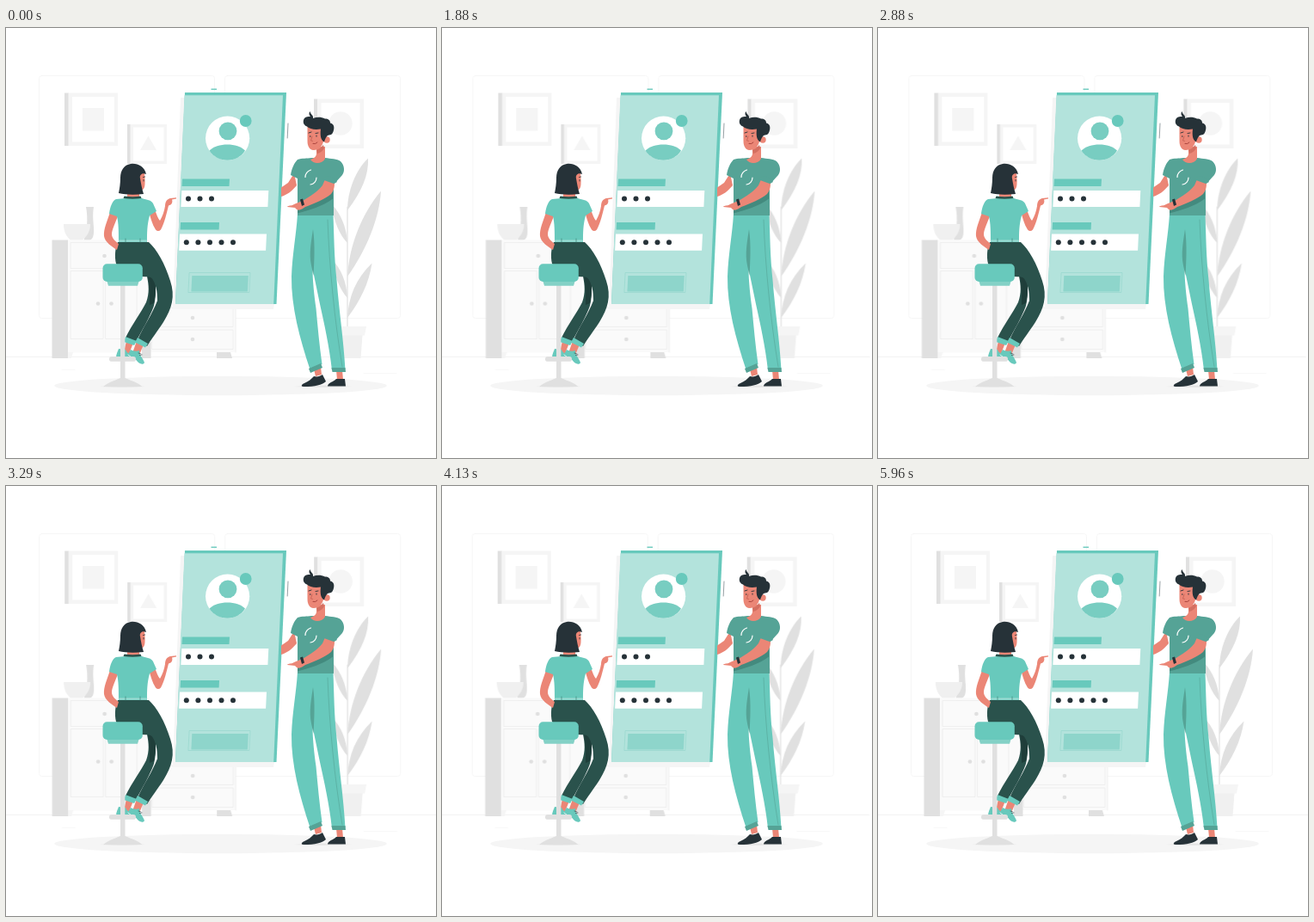
These frames come from a looping animation (500 by 500 pixels, 6.04 s). An HTML page without scripts:

```html
<!DOCTYPE html>
<html lang="en">
<head>
<meta charset="utf-8">
<title>Sign in</title>
<style>
  html, body { margin: 0; width: 100%; height: 100%; overflow: hidden; background: #fff; }
  svg { display: block; width: 100%; height: 100%; }
  .teal { fill: #68c9bc; }
  .soft { fill: #78cdc1; }
  .deep { fill: #55a396; }
  .ink { fill: #263238; }
  .skin { fill: #eb8676; }
  .pants { fill: #2a524c; }
  .g1 { fill: #f5f5f5; }
  .g2 { fill: #f0f0f0; }
  .g3 { fill: #e0e0e0; }
  .white { fill: #fff; }
  .line { fill: none; stroke-linecap: round; stroke-linejoin: round; }
  .room { animation: shake 6.04s linear -20ms infinite; }
  /* each leg lasts 600 ms */
  @keyframes shake {
    0%, 100% { transform: translateX(0); }
    9.93%, 89.4% { transform: translateX(-1px); }
    19.87%, 79.47% { transform: translateX(2px); }
    29.8%, 49.67%, 69.54% { transform: translateX(-4px); }
    39.74%, 59.6% { transform: translateX(4px); }
  }
</style>
</head>
<body>
<svg viewBox="0 0 500 500" xmlns="http://www.w3.org/2000/svg">
  <g class="room">
    <g class="line" stroke="#f4f4f4" stroke-width=".8">
      <rect x="38.500" y="55.500" width="204" height="282" rx="3"/>
      <rect x="254.500" y="55.500" width="204" height="282" rx="3"/>
    </g>
    <path class="line" stroke="#ededed" stroke-width=".7" d="M0 382.400H500"/>
    <path class="line" stroke="#f3f3f3" stroke-width=".6" d="M65 397.500h15M416 401.500h38"/>

    <!-- pictures -->
    <path class="g3" d="M68 75.500h5v61.500h-5z"/>
    <path class="g1" d="M72.500 75.500h57.500v61.500h-57.500z"/>
    <path class="white" d="M77 80h49v52.500h-49z"/>
    <path class="g1" d="M89 93h25v26.500h-25z"/>
    <path class="g3" d="M141 112h4v46h-4z"/>
    <path class="g1" d="M144.500 112h42.500v46h-42.500z"/>
    <path class="white" d="M148 115.500h35.500v39h-35.500z"/>
    <path class="g1" d="M165.500 125.500l9.500 16.500h-19z"/>
    <path class="g3" d="M358 82.500h4.500v57.500h-4.500z"/>
    <path class="g1" d="M362 82.500h54v57.500h-54z"/>
    <path class="white" d="M366.500 87h45v48.500h-45z"/>
    <circle class="g1" cx="389" cy="111" r="13.700"/>

    <!-- cabinets -->
    <path class="g3" d="M93 208h9c-1.500 10-.5 15 0 24c.6 9-1 14-4.500 14.500h-7c4-10 5-25 2.500-38.500z"/>
    <path class="g2" d="M67 228h31c0 9-4 14-9 18.500h-14c-5-4-8-10-8-18.500z"/>
    <path fill="#fafafa" d="M72 246.500h94v131h-94zM168 319h99v58h-99z"/>
    <path class="g3" d="M53.500 246.500h18.500v137.500h-18.500zM158 365h10.500v19h-10.500zM245 377h16l2 7h-18z"/>
    <path class="g1" d="M72 377h6l-2 7h-4z"/>
    <g class="line" stroke="#ececec" stroke-width=".8">
      <path d="M75.500 249.500h75v30h-75zM75.500 282.500h37.500v79h-37.500zM116 282.500h36v79h-36z"/>
      <path d="M170 325.500h94v22h-94zM170 351h94v22.500h-94zM267 319v58"/>
    </g>
    <g class="g3">
      <circle cx="114.500" cy="265" r="2.300"/><circle cx="107" cy="320.500" r="2.300"/>
      <circle cx="122.500" cy="320.500" r="2.300"/><circle cx="217" cy="337" r="2.300"/>
      <circle cx="217" cy="362" r="2.300"/>
    </g>

    <!-- plant -->
    <path class="line" stroke="#e0e0e0" stroke-width="1.200" d="M397 208V348"/>
    <g class="g3">
      <path d="M421 151.500C422 170 414 190 397 212C397 190 406 166 421 151.500z"/>
      <path d="M436 189.500C434 222 419 258 397 289C399 252 414 216 436 189.500z"/>
      <path d="M425.500 273.500C422 297 412 317 397 337C398 313 407 291 425.500 273.500z"/>
      <path d="M379 205C389 216 396 231 397 250C388 241 381 225 379 205z"/>
      <path d="M380 270C389 280 396 294 397 314C388 304 382 289 380 270z"/>
    </g>
    <path class="g2" d="M384.500 357h30l-2 27h-26z"/>
    <path class="g1" d="M382 347h37l-2 10.500h-33z"/>
  </g>

  <ellipse class="g1" cx="249.500" cy="416" rx="193.500" ry="11.200"/>
  <path fill="#e4e4e4" d="M109 417q26-3 53 0q-27 1.500-53 0zM334 417q35-3 69 0q-35 1.500-69 0z"/>

  <!-- phone -->
  <path class="g1" d="M203 81h8l-6 240h107l-1 6h-117z"/>
  <path class="teal" d="M208 75h118l-11.500 246h-117.500z"/>
  <path fill="#b3e3dc" d="M207.500 78.300h114.500l-10.800 242.700h-114.200z"/>
  <path class="teal" d="M238.500 70.500h6.500v1.400h-6.500z"/>
  <path class="line" stroke="#7c888d" stroke-width=".8" d="M328 111l-.8 17"/>
  <circle class="white" cx="257.600" cy="128.200" r="25.600"/>
  <circle class="soft" cx="258" cy="119.800" r="10.400"/>
  <path class="soft" d="M236.500 142.500c9-9.500 33-9.500 41.500 0c-9 15-32 15-41.500 0z"/>
  <circle class="teal" cx="278.700" cy="108" r="6.900"/>
  <path class="teal" d="M205 175.500h55l-.5 8.500h-55zM203 226h45l-.4 8.500h-45z"/>
  <path class="white" d="M204.300 189h101l-.9 19h-101zM202 239.500h101l-.9 19.200h-101z"/>
  <g class="ink">
    <circle cx="212" cy="198.500" r="3"/><circle cx="225.500" cy="198.500" r="3"/>
    <circle cx="239" cy="198.500" r="3"/>
    <circle cx="209.800" cy="249.200" r="3"/><circle cx="223.400" cy="249.200" r="3"/>
    <circle cx="237" cy="249.200" r="3"/><circle cx="250.500" cy="249.200" r="3"/>
    <circle cx="264" cy="249.200" r="3"/>
  </g>
  <path fill="#8ed5cb" d="M216.300 288h65.500l-.9 18.500h-65.500z"/>
  <path class="line" stroke="#93d5cc" stroke-width=".6" d="M213.500 284.500h70.500l-1.200 23h-70.500z"/>

  <!-- stool base -->
  <path class="g3" d="M133 299h5.300v108c7 3 15 5 20 10h-45c5-5 13-7 19.700-10z"/>

  <!-- woman -->
  <path class="skin" d="M140 364l-3 13 6 2 5-13zM152 364l-5 14 8 2 5-12z"/>
  <path class="pants" d="M150 274h18c6 16 8 32 4 49c-5 14-13 27-21 42l-12-5c8-16 18-29 24-41c4-11 3-20 1-30z"/>
  <path fill="#1f3e3a" d="M165 289l8 3c2 10 1 19-1 28l-5 2c0-10 0-22-2-33z"/>
  <path class="pants" d="M130 249h36c9 8 19 25 25 45c6 18 2 32-8 48c-7 11-13 18-19 28l-11-7c6-15 17-30 23-46c0-10-1-20-8-28c-16 1-32-2-40-15c-2-9-1-18 2-25z"/>
  <path class="teal" d="M139 359l13 5-3 5-12-4zM153 360l12 7-3 4.500-12-6z"/>
  <path class="teal" d="M131 373l8 1c1 3 5 6 8 7l-1 3-18-1c0-4 2-7 3-10zM145 374c3 2 7 2 10 1c0 6 4 8 6 14c-1 3-5 2-8-1c-3-4-8-8-11-9z"/>
  <path class="line" stroke="#fff" stroke-width=".8" d="M128 382.500h9M142 380q7 4 12 10"/>
  <path class="line" stroke="#263238" stroke-width=".6" d="M154 378l3 1M155.500 380.500l2.500-.5"/>
  <rect class="g3" x="120" y="382" width="31" height="5.800" rx="2.900"/>
  <path class="g3" d="M133 300h5.300v108h-5.300z"/>
  <path fill="#83d1c6" d="M117 293h38l-2 6.800h-34z"/>
  <rect class="teal" x="112.500" y="274.300" width="46.300" height="20.700" rx="5"/>
  <path class="skin" d="M121 214c-3 10-8 20-7 28c1 7 9 12 15 16l2-7c-4-3-8-7-8-11c0-6 5-15 8-24z"/>
  <path class="skin" d="M166 213l7-2c2 6 4 11 6 13c3-5 5-11 6-17c0-5 2-8 6-9l7-.7v1.200l-5 1c1 3 0 6-4 7c-2 8-5 21-9 28c-2 2-4 2-6 0c-4-6-6-14-8-21.500z"/>
  <path class="teal" d="M139 198c7-1 13-1 19 0c6 2 11 2 13 6l4 9-8 5c-3 11-3 20-3 31h-33c0-12 0-22-2-30l-9-3c1-8 4-16 8-17z"/>
  <path class="line" stroke="#9bdcd3" stroke-width="2" d="M132 247.500h31"/>
  <path class="line" stroke="#3f857a" stroke-width=".7" d="M139 245v4M156 245v4"/>
  <path class="skin" d="M141 189h14v8h-14z"/>
  <path class="pants" d="M137.500 195.500q10 1.500 19 0l1 2.500q-10 1.500-21 0z"/>
  <path class="skin" d="M151 167l10 1c0 5 1 9 .5 13c0 5-2 8-6 8l-6 1z"/>
  <path class="ink" d="M163 170c-2-9-10-13-18-12c-8 1-12 8-12 16c0 7-1 13-2 18c8 2 19 2 29 1c-2-6-3-12-4-18c-1-4 2-7 7-5z"/>
  <path class="line" stroke="#263238" stroke-width=".8" d="M159.500 173.500l2-.5M160 176.500v1.500"/>

  <!-- man -->
  <path class="skin" d="M335 169l-7 11c-4 3-8 5-8 6v10c7-2 12-6 18-13z"/>
  <path class="skin" d="M358 397l2 8 7-2-1-9zM384 398l1 11h7l-1-11z"/>
  <path class="teal" d="M339 217h41.500c1 26 1 48 4 76c3 38 8 69 10 104.500l-15.500.5c-3-28-9-54-14-77l-8.500-41c0 14 2 32 4 46c2 22 4 44 7 65l-14 6c-12-36-22-73-21.500-108c1-27 5.500-48 7-72.500z"/>
  <path class="deep" d="M357 234c-2 14-5 28-2 42l2.500 12c1-18 2-36-.5-54z"/>
  <path class="line" stroke="#55a396" stroke-width=".6" d="M374 223c2 56 8 116 17 171"/>
  <path class="deep" d="M352 396l14-6 2 5-14 6zM378.500 395h16l.5 5h-15.500z"/>
  <path class="ink" d="M358 405c4 1 7 0 10-2l4 8c-5 4-12 6-26 6c-4 0-2-3 1-4c5-2 8-5 11-8zM384 408h10l1 8.500h-21c0-4 7-5 10-8.500z"/>

  <path class="deep" d="M355 151h16c7 1 14 1 18 4c5 5 5 12 2 16l-10 11v36h-42v-43l-8-4c1-7 4-14 8-18c5-2 11-1 16-2z"/>
  <path fill="#438a7e" d="M339 210.500c14-4 28-12 41-21v9c-12 9-27 13-41 17z"/>
  <path class="skin" d="M371 176l11 4c0 6-1 9-4 13c-7 6-19 11-30 15c-3 2-7 5-10 3l-2-2-9-1c0-1 4-1.500 6-2c4-2 8-4 12-5c8-5 18-11 23-18z"/>
  <path class="ink" d="M342 199.500l3-1 2 7-3 1.500z"/>
  <path class="deep" d="M373 172c5 1 9 2 12 7l-4 2-14-5z"/>
  <g class="line" stroke="#fff" stroke-width="1.200">
    <path d="M354.500 165c-4 1.500-6.500 5-6.500 8.500"/>
    <path d="M361 174c0 4-3 7.500-7 8"/>
  </g>

  <path class="skin" d="M361 138h10v14c-3 6-13 7-17 1c5-2 7-4 7-7z"/>
  <path class="skin" d="M350.500 114h19v14c0 8-5 14-12 14c-5-.5-7-5-7-11z"/>
  <circle class="skin" cx="373" cy="130" r="3.700"/>
  <path fill="#d46f61" d="M361 142q5-2 8-6l1 4q-3 5-8 6z"/>
  <path class="ink" d="M346 107c1-4 5-4 8-4c-2-2-2-5 0-6c-1 3 4 4 3 8c5-2 10-1.500 14 .5c4 0 6 2 6 5c5 1 5 6 3.500 10c-1 3-3 4-5 4c-2 0-4 3-5.500 8c-4-2-5-8-4-15c-7 1-13 0-16-3c-3-1-5-4-4-7.500z"/>
  <g class="line" stroke="#263238" stroke-width=".9">
    <path d="M352 122l3-1M360 122.500l3-.5M353.800 125.500v1M361 125v1.200"/>
    <path stroke="#c25f52" stroke-width=".8" d="M356 126l-1.500 5 2 .4"/>
    <path stroke="#a33e38" d="M357 134.500q3 1 5-1.500"/>
  </g>
</svg>
</body>
</html>
```
